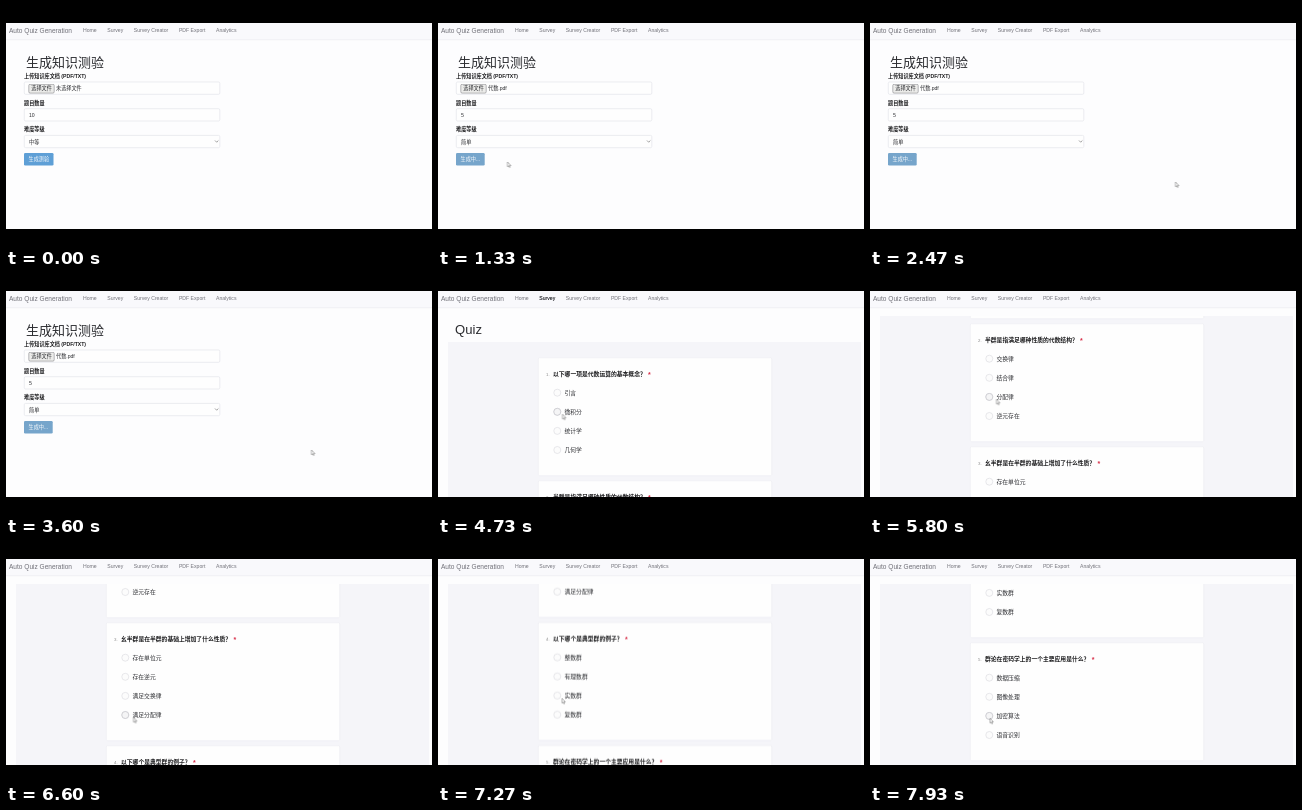
Recreate the animation shown at these times as an HTML page. Size 426x240 px, loop 8000 ms.

```html
<!DOCTYPE html>
<html lang="zh-CN">
<head>
<meta charset="utf-8">
<title>Auto Quiz Generation</title>
<style>
  html, body { margin: 0; width: 100%; height: 100%; overflow: hidden; background: #000; }
  svg { display: block; width: 100vw; height: 100vh; }
  text {
    font-family: "Liberation Sans", "Noto Sans CJK SC", "Noto Sans CJK", sans-serif;
    fill: #2b2c30; white-space: pre;
  }
  .bold { font-weight: 700; fill: #1c1c1e; }
  .nav { fill: #707078; }
  .white { fill: #fff; }
  .star { fill: #d8304a; font-weight: 700; }
  .num { fill: #888; }
  .field { fill: #fefefe; stroke: #e2e4ea; stroke-width: .7; }
  .picker { fill: #ececea; stroke: #85858a; stroke-width: .6; }
  .chevron { fill: none; stroke: #777; stroke-width: .7; }
  .panel { fill: #f5f5f9; }
  .card { fill: #fefefe; stroke: #ececf2; stroke-width: .6; }
  .radio { fill: #fcfcfc; stroke: #dedee3; stroke-width: .7; }
  .hover { fill: #f5f5f6; stroke: #c2c2c8; stroke-width: .7; }
</style>
</head>
<body>
<svg viewBox="0 0 426 240">
  <defs>
    <clipPath id="view"><rect y="42" width="426" height="181"/></clipPath>
  </defs>
  <rect width="426" height="240"/>
  <rect y="17" width="426" height="206" fill="#fdfdfe"/>
  <g id="form"></g>
  <g id="quiz" clip-path="url(#view)"><g id="page"></g></g>
  <g id="nav">
    <rect y="17" width="426" height="17" fill="#f9f9fc"/>
    <rect y="33.5" width="426" height=".7" fill="#ececf1"/>
  </g>
  <path id="cursor" d="M0 0V4.8L1.1 3.8 1.9 5.5 2.6 5.2 1.9 3.5H3.4Z" fill="#fff" stroke="#666" stroke-width=".5"/>
</svg>
<script>
const LOOP = 8000, GLIDE = 500, CLICK = 1100, QUIZ_AT = 4300;
const $ = id => document.getElementById(id);

function add(parent, tag, attrs) {
  const el = document.createElementNS('http://www.w3.org/2000/svg', tag);
  for (const key in attrs) el.setAttribute(key, attrs[key]);
  return parent.appendChild(el);
}
const rect = (parent, x, y, width, height, attrs) =>
  add(parent, 'rect', { x, y, width, height, rx: 1.3, ...attrs });

// y is the vertical middle of the line
function label(parent, x, y, size, content, cls = '') {
  const el = add(parent, 'text', { x, y: y + size * .36, 'font-size': size, class: cls });
  el.textContent = content;
  return el;
}

const play = (el, frames) => el.animate(frames, { duration: LOOP, iterations: Infinity });

function show(el, from, to = LOOP) {
  const visible = ms => ({ offset: ms / LOOP, opacity: ms >= from && ms < to ? 1 : 0, easing: 'step-end' });
  play(el, [...new Set([0, from, to, LOOP])].map(visible));
}

// Rests at each stop, then glides so as to arrive at the next one in time
function move(el, stops) {
  const frames = [];
  const key = (ms, { x, y }) => frames.push({
    offset: ms / LOOP, transform: `translate(${x}px, ${y}px)`, easing: 'ease-in-out'
  });
  let last = { ...stops[0], at: 0 };
  key(0, last);
  for (const stop of stops) {
    key(Math.max(last.at, stop.at - GLIDE), last);
    key(stop.at, stop);
    last = stop;
  }
  key(LOOP, last);
  play(el, frames);
}

// Navigation
const nav = $('nav');
label(nav, 3, 24.5, 6.55, 'Auto Quiz Generation', 'nav');
let linkX = 77;
for (const name of ['Home', 'Survey', 'Survey Creator', 'PDF Export', 'Analytics']) {
  const link = label(nav, linkX, 24.3, 5.13, name, 'nav');
  if (name === 'Survey') show(label(nav, linkX, 24.3, 5.13, name), QUIZ_AT - 100, QUIZ_AT + 800);
  linkX += link.getComputedTextLength() + 10.6;
}

// Form
const form = $('form');
const swap = (x, y, before, after, at, cls) => {
  show(label(form, x, y, 5.13, before, cls), 0, at);
  show(label(form, x, y, 5.13, after, cls), at);
};
label(form, 20, 56, 13, '生成知识测验');
const cursorStops = [
  ['上传知识库文档 (PDF/TXT)', '未选择文件', '代数.pdf'],
  ['题目数量', '10', '5'],
  ['难度等级', '中等', '简单']
].map(([name, before, after], i) => {
  const y = 70 + 26.7 * i, at = 300 + 250 * i;
  label(form, 18, y, 5.13, name, 'bold');
  rect(form, 18.3, y + 6, 195.5, 12.3, { class: 'field' });
  swap(i ? 23 : 50, y + 12.4, before, after, at);
  return { at, x: 50, y: y + 13 };
});
rect(form, 22.8, 78.3, 25.4, 8.8, { class: 'picker' });
label(form, 25.3, 82.5, 5.13, '选择文件');
add(form, 'path', { d: 'M209 134.5l1.7 1.7 1.7-1.7', class: 'chevron' });
show(rect(form, 18, 147, 29.5, 12.5, { fill: '#5e9fd6' }), 0, CLICK);
show(rect(form, 18, 147, 28.7, 12.5, { fill: '#76a5cb' }), CLICK);
swap(22.5, 153.2, '生成测验', '生成中...', CLICK, 'white');

// Quiz
const questions = [
  ['以下哪一项是代数运算的基本概念？', '引言', '微积分', '统计学', '几何学'],
  ['半群是指满足哪种性质的代数结构？', '交换律', '结合律', '分配律', '逆元存在'],
  ['幺半群是在半群的基础上增加了什么性质？', '存在单位元', '存在逆元', '满足交换律', '满足分配律'],
  ['以下哪个是典型群的例子？', '整数群', '有理数群', '实数群', '复数群'],
  ['群论在密码学上的一个主要应用是什么？', '数据压缩', '图像处理', '加密算法', '语音识别']
];
const titleY = q => 100 + 123 * q;
const optionY = (q, k) => titleY(q) + 19.1 * (k + 1);
const radio = (q, k, cls) =>
  add(page, 'circle', { cx: 119.3, cy: optionY(q, k) - .4, r: 3.5, class: cls });

const page = $('page');
label(page, 17, 55.2, 13.1, 'Quiz');
rect(page, 10, 68, 413, 700, { rx: 0, class: 'panel' });
questions.forEach(([title, ...options], q) => {
  const y = titleY(q);
  rect(page, 100.3, y - 16.3, 233.4, 118, { class: 'card' });
  label(page, 108, y, 4.4, q + 1 + '.', 'num');
  label(page, 115, y, 5.8, title, 'bold');
  label(page, 117.3 + title.length * 5.8, y + .8, 7, '*', 'star');
  options.forEach((option, k) => {
    radio(q, k, 'radio');
    label(page, 126.5, optionY(q, k), 5.8, option);
  });
});

// Each visit scrolls to a question and points at one of its options
const visits = [
  { at: 4680, option: 1, scroll: 0, x: 124.5 },
  { at: 5600, option: 2, scroll: 157, x: 126.5 },
  { at: 6500, option: 3, scroll: 249, x: 127.5 },
  { at: 7150, option: 2, scroll: 372, x: 124 },
  { at: 7750, option: 2, scroll: 475, x: 120 }
];
visits.forEach(({ at, option }, q) => {
  const next = visits[q + 1];
  show(radio(q, option, 'hover'), at, next ? Math.max(at, next.at - GLIDE) : LOOP);
});

show(form, 0, QUIZ_AT);
show($('quiz'), QUIZ_AT);
show($('cursor'), 200);
move(page, visits.map(({ at, scroll }) => ({ at, x: 0, y: -scroll })));
move($('cursor'), [
  ...cursorStops,
  { at: CLICK, x: 38, y: 154 },
  { at: 1330, x: 69.5, y: 156 },
  { at: 2300, x: 305.5, y: 176 },
  { at: QUIZ_AT - 100, x: 109, y: 25 },
  ...visits.map(({ at, option, scroll, x }, q) => ({ at, x, y: optionY(q, option) - scroll + 2 }))
]);
</script>
</body>
</html>
```
